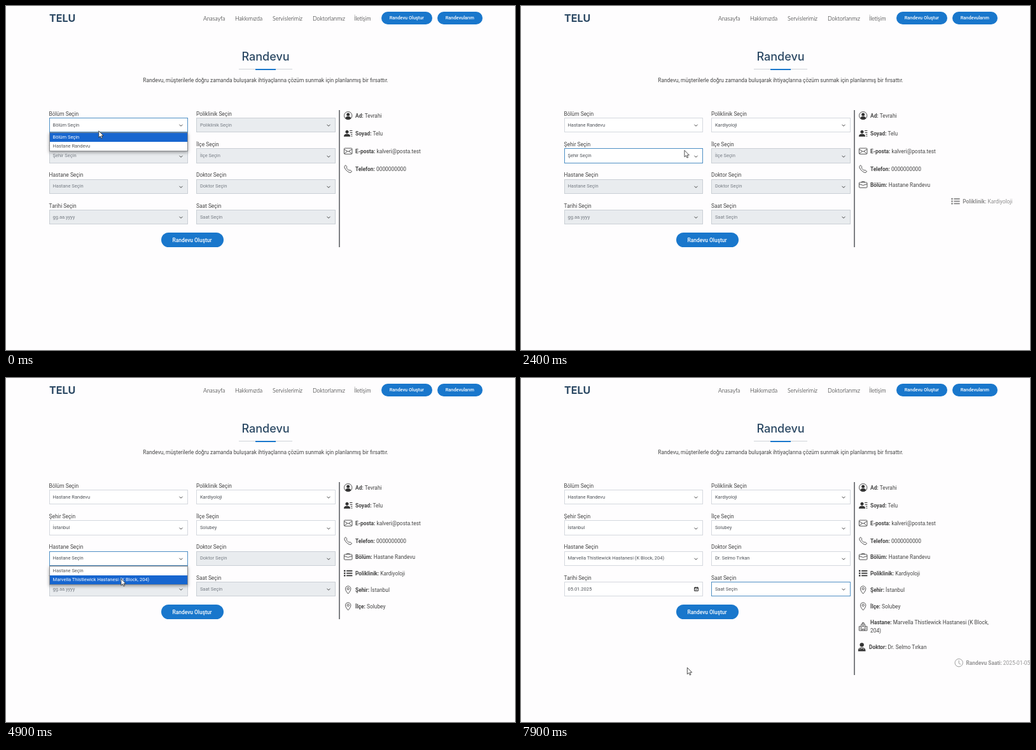
Animation, 800 px wide and 542 px high, one loop 8 s. Source, as an HTML page:

```html
<!DOCTYPE html>
<html lang="tr">
<head>
<meta charset="utf-8">
<title>Randevu</title>
<style>
html, body { margin: 0; width: 100%; height: 100%; overflow: hidden; background: #fefdfe; }
#stage { position: relative; width: 800px; height: 542px; overflow: hidden; font: 8.4px Roboto, sans-serif; color: #444; }
#stage div, #stage svg { position: absolute; box-sizing: border-box; }
.txt { line-height: 12px; white-space: nowrap; }
.mid { transform: translateX(-50%); }
.btn { background: #1977cc; border-radius: 12px; }
.box { width: 218.5px; height: 23.4px; border: 1px solid #ced4da; }
.pop { width: 218.5px; background: #fff; border: 1px solid #85888c; box-shadow: 0 2px 5px rgba(0, 0, 0, .35); overflow: hidden; }
.ghost { background: rgba(255, 255, 255, .4); border-color: rgba(0, 0, 0, .08); }
.ghost > * { visibility: hidden; }
.opt { left: 0; right: 0; height: 14px; padding-left: 5px; line-height: 14px; font-size: 7.5px; color: #555; white-space: nowrap; }
.on { background: #1766cf; color: #fff; }
b { font-weight: 700; }
</style>
</head>
<body>
<div id="stage"></div>
<script>
const LOOP = 8000;
const stage = document.getElementById('stage');
const clamp = v => Math.max(0, Math.min(1, v));

function add(parent, cls, x, y, w, h, html = '') {
  const el = document.createElement('div');
  el.className = cls;
  el.style.left = x + 'px';
  el.style.top = y + 'px';
  if (w) el.style.width = w + 'px';
  if (h) el.style.height = h + 'px';
  el.innerHTML = html;
  parent.append(el);
  return el;
}

// Text whose vertical middle is at y
function text(parent, x, y, html, css = '', cls = '') {
  const el = add(parent, 'txt ' + cls, x, y - 6, 0, 0, html);
  el.style.cssText += css;
  return el;
}

const svg = (x, y, size, view, body) =>
  `<svg style="left:${x}px;top:${y}px" width="${size}" height="${size}" viewBox="0 0 ${view} ${view}" fill="none" stroke="#333" overflow="visible">${body}</svg>`;
const show = (el, on) => { el.style.display = on ? '' : 'none'; };

// Header
text(stage, 68, 18.5, 'TELU', 'font:700 16px/12px Inter,sans-serif;color:#2c4964');
[[310, 'Anasayfa'], [360, 'Hakkımızda'], [419, 'Servislerimiz'], [482, 'Doktorlarımız'], [547, 'İletişim']]
  .forEach(([x, s]) => text(stage, x, 19.5, s, 'font:300 8.8px/12px Lato,sans-serif;color:#000'));

function button(x, y, w, h, label, size) {
  add(stage, 'btn', x, y, w, h);
  text(stage, x + w / 2, y + h / 2, label, `font-weight:500;font-size:${size}px;color:#fff`, 'mid');
}
button(589.7, 9, 80.3, 19.6, 'Randevu Oluştur', 7.35);
button(678, 9, 70.7, 19.6, 'Randevularım', 7.35);

text(stage, 408, 79.5, 'Randevu', 'font:500 18px/12px Inter,sans-serif;color:#2c4964', 'mid');
add(stage, '', 366, 99.2, 84, 1).style.background = '#cfd3d8';
add(stage, '', 392, 98.7, 32, 2).style.background = '#1977cc';
text(stage, 408, 117, 'Randevu, müşterilerle doğru zamanda buluşarak ihtiyaçlarına çözüm sunmak için planlanmış bir fırsattır.', '', 'mid');
button(243.5, 357, 98, 23.3, 'Randevu Oluştur', 8.4);

// Form fields: on = enabled, set = value chosen, focus and open = time spans, hover = [time, option]
const HOSPITAL = 'Marvella Thistlewick Hastanesi (K Block, 204)';
const DOCTOR = 'Dr. Selmo Tırkan';
const DISTRICT = 'Solubey';
const list = s => s.split('|');
const fields = [
  { label: 'Bölüm Seçin', value: 'Hastane Randevu', on: -1, set: 600, focus: [-500, 650], open: [-500, 600],
    opts: ['Hastane Randevu'], hover: [[0, 0], [350, 1]] },
  { label: 'Poliklinik Seçin', value: 'Kardiyoloji', on: 700, set: 2150, focus: [700, 2200], open: [1500, 2150],
    opts: list('Kardiyoloji|Nöroloji|Dermatoloji|Pediatri|Ortopedi|Dahiliye|Kadın Hastalıkları ve Doğum|Gastroenteroloji|Psikiyatri|Göz Hastalıkları|Kulak Burun Boğaz|Üroloji|Genel Cerrahi|Endokrinoloji|Ağız ve Diş Sağlığı'),
    hover: [[0, 0], [1950, 1]] },
  { label: 'Şehir Seçin', value: 'İstanbul', on: 2200, set: 3250, focus: [2250, 3250], open: [2650, 3250],
    opts: list('İstanbul|Ankara|İzmir|Bursa|Antalya|Konya|Adana|Trabzon|Eskişehir|Kayseri|Mersin|Gaziantep|Şanlıurfa|Diyarbakır|Samsun|Van|Balıkesir|Kocaeli|Hatay'),
    hover: [[0, 0], [2880, 1]], scroll: true },
  { label: 'İlçe Seçin', value: DISTRICT, on: 3300, set: 4050, focus: [3300, 4130], open: [3680, 4050],
    opts: list(DISTRICT + '|Üsküdar|Bakırköy|Fatih|Beyoğlu|Sarıyer|Maltepe|Kartal'), hover: [[0, 0], [3880, 1]] },
  { label: 'Hastane Seçin', value: HOSPITAL, on: 4050, set: 4920, focus: [4030, 4950], open: [4580, 4920],
    opts: [HOSPITAL], hover: [[0, 0], [4800, 1]] },
  { label: 'Doktor Seçin', value: DOCTOR, on: 5000, set: 5920, focus: [5050, 5950], open: [5450, 5920],
    opts: [DOCTOR], hover: [[0, 0], [5750, 1]] },
  { label: 'Tarihi Seçin', hint: 'gg.aa.yyyy', value: '05.01.2025', on: 6000, set: 7300, focus: [6000, 6250], date: true },
  { label: 'Saat Seçin', on: 7400, set: 9999, focus: [7450, 9000] }
];

const chevron = svg(202.7, 7.3, 8, 8, '<path d="M1.5 2.8 4 5.3 6.5 2.8" stroke="#444"/>');
const dateIcon = svg(203.5, 7, 7, 7, '<path d="M.6 1.2h5.8v5.2H.6zM.6 2h5.8M2 0v1.6M5 0v1.6M2 4.2l1 1 1.8-1.8" stroke="#222"/>');

fields.forEach((f, i) => {
  const x = i % 2 ? 299 : 67.6;
  const y = 175.9 + 48.35 * (i >> 1);
  text(stage, x, y - 6.3, f.label);
  f.box = add(stage, 'box', x, y);
  f.text = text(f.box, 4.9, 10.7, '', 'font-size:7.5px');
  f.icon = add(f.box, '', 0, 0);
  f.icon.innerHTML = chevron + (f.date ? dateIcon : '');
  f.x = x;
  f.bottom = y + 23.2;
});

fields.filter(f => f.opts).forEach(f => {
  const names = [f.label, ...f.opts];
  const height = f.scroll ? 281.5 : names.length * 14 + 2;
  const width = f.scroll ? 208.5 : 216.5;
  f.pop = add(stage, 'pop', f.x, f.bottom, 0, height);
  f.rows = names.map((s, i) => add(f.pop, 'opt', 0, i * 14, width, 14, s));
  if (!f.scroll) return;
  add(f.pop, '', 208.5, 0, 8, 280).style.background = '#fafafa';
  const thumb = add(f.pop, '', 210.2, 9, 4.5, 169);
  thumb.style.cssText += 'background:#c6c7c9;border-radius:2px';
  add(f.pop, '', 0, 0, 0, 0,
    svg(209, 2, 7, 7, '<path d="M1.5 4.5l2-2 2 2" stroke="#888"/>') +
    svg(209, 272, 7, 7, '<path d="M1.5 2.5l2 2 2-2" stroke-width="1.2"/>'));
});

// Calendar
const cal = add(stage, 'pop', 67.6, 344.5, 115.5, 147);
cal.style.cssText += 'border-color:#b9bbbe;box-shadow:0 1px 5px rgba(0,0,0,.45)';
text(cal, 5.2, 11, 'Aralık 2024', 'font-size:6.4px;font-weight:700;color:#222');
add(cal, '', 0, 0, 0, 0,
  svg(40.2, 8.6, 4.5, 6, '<path d="M.5 1.8h5L3 5z" fill="#222" stroke="none"/>') +
  svg(79.2, 6, 10, 10, '<path d="M5 9.5V.8M1 4.8l4-4 4 4" stroke="#bbb"/>') +
  svg(95.4, 6, 10, 10, '<path d="M5 .5v8.7M1 5.2l4 4 4-4"/>'));
const colX = c => 12.6 + 14.68 * c;
list('Pt|Sa|Ça|Pe|Cu|Ct|Pa').forEach((s, c) =>
  text(cal, colX(c), 30, s, 'font-size:6.6px;font-weight:500;color:#333', 'mid'));
const TODAY = 33;
const pick = add(cal, '', colX(6) - 7, 112, 14, 14);
pick.style.background = '#e4e5e8';
for (let i = 0; i < 42; i++) {
  const day = i < 6 ? 25 + i : i <= 36 ? i - 5 : i - 36;
  const x = colX(i % 7), y = 45.6 + 14.7 * Math.floor(i / 7);
  if (i === TODAY) add(cal, '', x - 7.3, y - 6.8, 14.7, 14).style.cssText += 'background:#0b6fe8;border:1px solid #24476f';
  const color = i < TODAY ? '#b0b0b0' : i === TODAY ? '#fff' : '#333';
  text(cal, x, y, day, `font-size:6.6px;color:${color};font-weight:${i === TODAY ? 700 : i > TODAY ? 500 : 400}`, 'mid');
}
text(cal, 11.4, 135.5, 'Temizle', 'font-size:6.6px;color:#1a73d9');
text(cal, 84.2, 135.5, 'Bugün', 'font-size:6.6px;color:#1a73d9');

// Summary column
const rule = add(stage, '', 523, 163.5, 2, 216);
rule.style.background = '#7d7f83';

const PIN = '<path d="M8 15.4C5 12 3 9 3 6a5 5 0 0 1 10 0c0 3-2 6-5 9.4z"/><circle cx="8" cy="6" r="2"/>';
const icons = {
  person: '<circle cx="8" cy="8" r="7.4"/><circle cx="8" cy="6" r="3" fill="#333" stroke="none"/><path d="M2.5 13c1-3 3-3.5 5.5-3.5s4.5.5 5.5 3.5A8 8 0 0 1 8 15.5 8 8 0 0 1 2.5 13z" fill="#333" stroke="none"/>',
  lines: '<g fill="#333" stroke="none"><circle cx="6" cy="5" r="3"/><path d="M0 14c0-4 3-5 6-5s6 1 6 5z"/></g><path d="M11 3h5M11.5 6.5H16M13 10h3M13.5 13H16" stroke-width="1.2"/>',
  mail: '<rect x=".5" y="2.5" width="15" height="11" rx="1.5"/><path d="M.7 4.5 8 9l7.3-4.5M1 12.8l5.5-4.5M15 12.8 9.5 8.3"/>',
  phone: '<path d="M3.2 1 1.3 2.8C.5 4 1.5 7.5 5 11s7 4.5 8.2 3.7L15 12.8l-3.3-2.6-2.3.7L5.1 6.6l.7-2.3z"/>',
  bag: '<rect x=".5" y="3.5" width="15" height="10" rx="1.5"/><path d="M5.5 3.5V2h5v1.5M.5 6.5 8 9l7.5-2.5"/>',
  list: '<path d="M5 3.5h11M5 8h11M5 12.5h11" stroke-width="2"/><path d="M0 3.5h3M0 8h3M0 12.5h3" stroke-width="2.6"/>',
  pin: PIN,
  hospital: '<path d="M4.5 15.5v-12h7v12M.5 15.5v-8h4M11.5 7.5h4v8H.5M6.5 15.5v-3h3v3M6.5 3.5v-3h3v3M8 5v4M6 7h4M2 10h1M2 12.5h1M13 10h1M13 12.5h1"/>',
  doctor: '<g fill="#333" stroke="none"><circle cx="8" cy="4" r="3.8"/><path d="M1 16c0-5 2.5-7 7-7s7 2 7 7z"/></g><path d="M6.5 9.5 8 12l1.5-2.5M4.5 10v3M11.5 10v3" stroke="#fff"/>',
  clock: '<circle cx="8" cy="8" r="7.4"/><path d="M8 3.5V9l3.5 2"/>'
};
// [icon, label, value, middle y, slide start, text x]
const info = [
  ['person', 'Ad', 'Tevrahi', 173, -999],
  ['lines', 'Soyad', 'Telu', 201, -999],
  ['mail', 'E-posta', 'kalveri@posta.test', 229, -999],
  ['phone', 'Telefon', '0000000000', 257, -999],
  ['bag', 'Bölüm', 'Hastane Randevu', 282, 1000],
  ['list', 'Poliklinik', 'Kardiyoloji', 308, 2300],
  ['pin', 'Şehir', 'İstanbul', 333.5, 3390],
  ['pin', 'İlçe', DISTRICT, 359.5, 4210],
  ['hospital', 'Hastane', HOSPITAL.replace(' 204', '<br>204'), 385, 5020],
  ['doctor', 'Doktor', DOCTOR, 423.5, 5980, 547],
  ['clock', 'Randevu Saati', '2025-01-05', 449, 7808, 549]
].map(([icon, label, value, y, start, x = 549]) => {
  const two = icon === 'hospital';
  const el = add(stage, '', 0, 0, 0, 0, svg(x - 18.3, y - 6.7 + (two ? 6.5 : 0), 13.4, 16, icons[icon]));
  text(el, x, y, `<b>${label}:</b> ${value}`, two ? 'line-height:13px' : '');
  return { el, start, end: y + (two ? 32 : 19.3) };
});

// Pointer path: [time, x, y]
const path = [
  [0, 145.5, 196.5], [100, 146, 199], [400, 150, 217], [700, 151, 219], [1000, 151, 219], [1450, 340, 184], [1700, 340.5, 181],
  [1800, 341, 184], [2000, 344, 218], [2180, 344, 219], [2600, 182, 234], [2750, 180, 236], [2950, 176, 264],
  [3250, 174.5, 265.5], [3620, 341, 235], [3720, 342, 237], [3920, 340, 267], [4050, 338, 268],
  [4200, 298, 271], [4500, 182, 284], [4620, 180, 285], [4820, 180, 316], [4960, 181, 316],
  [5380, 340, 288], [5500, 341.5, 289], [5600, 342, 291], [5800, 342, 315], [5960, 341, 315],
  [6350, 275, 334], [6500, 273.5, 335.5], [6650, 270, 338], [7100, 170, 462], [7400, 169, 462], [7900, 261, 456], [8000, 275, 450]
];
const cursor = add(stage, '', 0, 0, 0, 0,
  svg(0, 0, 13, 13, '<path d="M.3.3v10.4l2.4-2.2 1.6 3.6 1.7-.8-1.6-3.4h3.3z" fill="#fff" stroke="#222" stroke-width=".8"/>'));

function pointer(t) {
  const i = Math.max(1, path.findIndex(p => p[0] > t));
  const [a, b] = [path[i - 1], path[i]];
  const k = (t - a[0]) / (b[0] - a[0]);
  const s = k * k * (3 - 2 * k);
  return [a[1] + (b[1] - a[1]) * s, a[2] + (b[2] - a[2]) * s];
}

function mix(a, b, k) {
  return `rgb(${a.map((v, i) => Math.round(v + (b[i] - v) * k))})`;
}

function drawField(f, t) {
  const on = t >= f.on;
  const focus = clamp((t - f.focus[0]) / 150) * (1 - clamp((t - f.focus[1]) / 150));
  f.box.style.background = on ? '#fff' : '#e9ecef';
  f.box.style.borderColor = mix(on ? [212, 216, 222] : [202, 207, 213], [78, 143, 196], focus);
  f.text.style.color = on ? '#4c5056' : '#757b83';
  const label = t >= f.set ? f.value : f.hint || f.label;
  if (f.text.textContent !== label) f.text.textContent = label;
  if (f.date) [...f.icon.children].forEach((el, i) => show(el, on === !!i));
  if (!f.pop) return;
  const [from, to] = f.open;
  show(f.pop, t >= from && t < to);
  f.pop.classList.toggle('ghost', t < from + 80);
  const active = f.hover.filter(h => t >= h[0]).pop()[1];
  f.rows.forEach((row, i) => row.classList.toggle('on', i === active));
}

function render(t) {
  fields.forEach(f => drawField(f, t));
  show(cal, t >= 6400 && t < 7300);
  show(pick, t >= 7050);
  let end = 380;
  info.forEach(r => {
    const k = 1 - Math.pow(1 - clamp((t - r.start) / 500), 1.8);
    show(r.el, t >= r.start);
    r.el.style.transform = `translateX(${218 * (1 - k)}px)`;
    r.el.style.opacity = clamp(k * 1.8);
    if (t >= r.start) end = Math.max(end, r.end - .4);
  });
  rule.style.height = end - 163.5 + 'px';
  const [x, y] = pointer(t);
  cursor.style.transform = `translate(${x}px, ${y}px)`;
}

const begin = performance.now();
function tick() {
  render((performance.now() - begin) % LOOP);
  requestAnimationFrame(tick);
}
tick();
</script>
</body>
</html>
```
